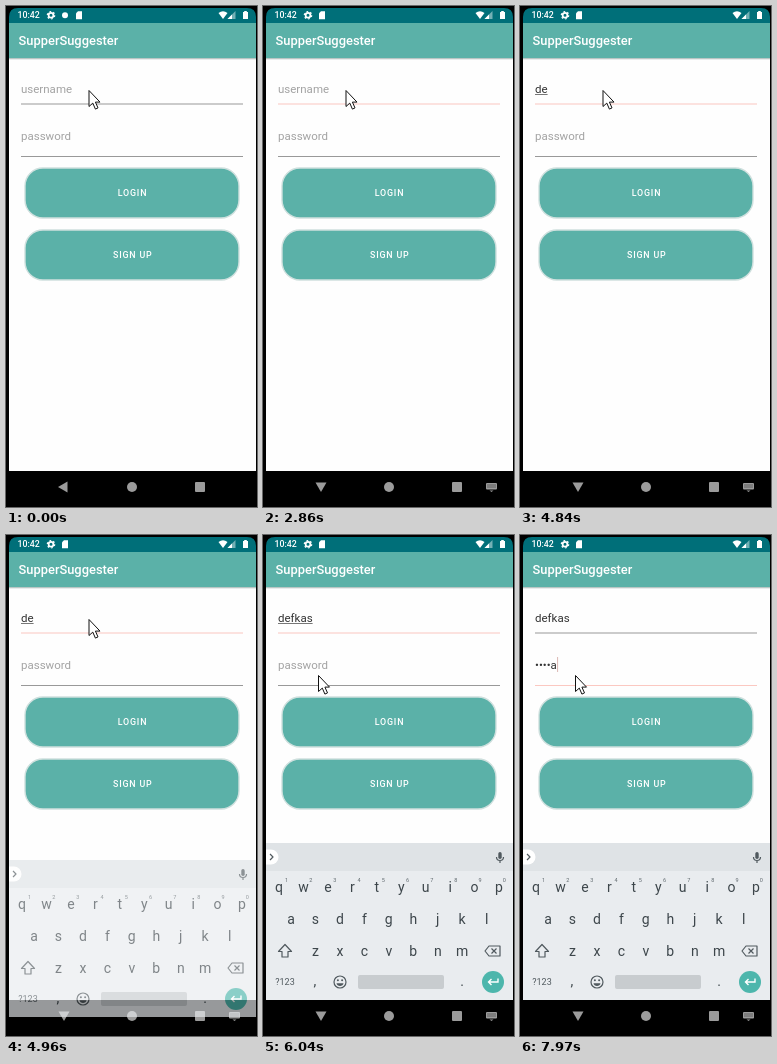
An HTML page that plays this animation: 251 px wide and 501 px high, repeating every 8 s.

```html
<!DOCTYPE html>
<html lang="en">
<head>
<meta charset="utf-8">
<title>Login screen</title>
<style>
html, body { margin: 0; overflow: hidden; background: #000; }
svg { display: block; font-family: Roboto, sans-serif; }
.field { font-size: 11.5px; }
.button rect { fill: #5bb1a8; stroke: #cfe0de; stroke-width: 1.4; }
.button text { font-size: 8.9px; font-weight: 500; letter-spacing: .8px; fill: #fff; text-anchor: middle; }
.key { font-size: 14px; fill: #3d464b; text-anchor: middle; }
.hint { font-size: 5.5px; fill: #5f686d; text-anchor: middle; }
.outline { fill: none; stroke: #50595e; stroke-width: 1.2; stroke-linejoin: round; }
</style>
</head>
<body>
<svg width="251" height="501" viewBox="0 0 251 501">
  <rect width="251" height="501" fill="#000"/>
  <rect x="3" y="40" width="247" height="425" fill="#fefefe"/>

  <!-- status bar -->
  <path d="M3 17V11Q3 2 12 2H241Q250 2 250 11V17Z" fill="#006f79"/>
  <g fill="#fff">
    <text x="11.5" y="12.4" font-size="8.8" font-weight="500">10:42</text>
    <circle cx="45" cy="9.3" r="2.4" fill="none" stroke="#fff" stroke-width="1.8"/>
    <circle cx="45" cy="9.3" r="3.7" fill="none" stroke="#fff" stroke-width="1.2" stroke-dasharray="1.7 2.17"/>
    <circle id="badge" cx="59" cy="9.3" r="3"/>
    <path id="card" d="M-1 -4H3V4H-3V-2Z"/>
    <path d="M212.5 7Q217 3.5 221.5 7L217 13Z"/>
    <path d="M229.5 5V13H221.5Z" opacity=".45"/>
    <path d="M226 8.5V13H221.5Z"/>
    <path d="M237 6H238.2V5H240.8V6H242V13H237Z"/>
  </g>

  <!-- app bar -->
  <rect x="3" y="17" width="247" height="35" fill="#5bb1a8"/>
  <rect x="3" y="52" width="247" height="1" fill="#b9c6c4"/>
  <rect x="3" y="53" width="247" height="1" fill="#e8ecec"/>
  <text x="12.5" y="39.3" font-size="12.9" font-weight="500" fill="#fff">SupperSuggester</text>

  <!-- form -->
  <text id="user" class="field" x="15" y="87"/>
  <rect id="compose" x="15" y="88" height="1" fill="#777"/>
  <rect id="userLine" x="15" y="97.5" width="222" height="1"/>
  <text id="pass" class="field" x="15" y="134"/>
  <rect id="passLine" x="15" y="150" width="222" height="1"/>
  <rect id="caret" width="1" height="15" fill="#dcb9b5"/>
  <g class="button">
    <rect x="19" y="162" width="214" height="50" rx="18"/>
    <text x="126.5" y="190.4">LOGIN</text>
    <rect x="19" y="224" width="214" height="50" rx="18"/>
    <text x="126.8" y="252.4">SIGN UP</text>
  </g>

  <!-- navigation bar -->
  <g fill="#9b9b9b">
    <path id="back" d="M-5 0L4.5 -5.5V5.5Z"/>
    <circle cx="126" cy="481" r="5"/>
    <rect x="189" y="476" width="10" height="10" rx="1"/>
    <g id="imeIcon">
      <rect x="223" y="477" width="11" height="6.5" rx="1"/>
      <path d="M224.5 479H233M224.5 481H233" stroke="#000" stroke-width=".8" stroke-dasharray="1 1"/>
      <path d="M226.5 484.5H230.5L228.5 486Z"/>
    </g>
  </g>

  <!-- keyboard -->
  <g id="keyboard">
    <rect x="3" y="308" width="247" height="157" fill="#e9ecef"/>
    <rect x="3" y="308" width="247" height="28" fill="#dfe3e6"/>
    <path d="M3 314.5H8A7.5 7.5 0 0 1 8 329.5H3Z" fill="#fff"/>
    <path class="outline" d="M7 319L10 322L7 325"/>
    <rect x="235.3" y="317" width="3.4" height="7" rx="1.7" fill="#50595e"/>
    <path class="outline" d="M233.5 322A3.5 3.5 0 0 0 240.5 322M237 325.5V328"/>
    <g id="keys"></g>
    <path class="outline" d="M22 409.5L28.5 416.5H25V422H19V416.5H15.5Z"/>
    <path class="outline" d="M222 416L226 411H237V421H226ZM228.5 413.5L233.5 418.5M233.5 413.5L228.5 418.5"/>
    <text x="22" y="450.3" font-size="9" fill="#50595e" text-anchor="middle">?123</text>
    <circle class="outline" cx="77" cy="447" r="6"/>
    <path d="M73.5 448.3H80.5A3.6 3.6 0 0 1 73.5 448.3Z" fill="#50595e"/>
    <circle cx="74.9" cy="445.3" r="1" fill="#50595e"/>
    <circle cx="79.1" cy="445.3" r="1" fill="#50595e"/>
    <rect x="95" y="440" width="86" height="14" rx="2" fill="#c8cccf"/>
    <circle cx="230" cy="447" r="11" fill="#4db6ac"/>
    <path d="M235 443.5V447H225.5M228.5 444L225.5 447L228.5 450" fill="none" stroke="#fff" stroke-width="1.4"/>
  </g>

  <path id="pointer" d="M0 0V16L3.8 12.6L6.4 18.6L9 17.4L6.4 11.6H11Z" fill="#fff" stroke="#111" stroke-linejoin="round"/>
</svg>
<script>
const LOOP = 8000;
const el = id => document.getElementById(id);
const set = (id, attrs) => {
  for (const name in attrs) el(id).setAttribute(name, attrs[name]);
};
const show = (id, on) => set(id, { visibility: on ? "visible" : "hidden" });

const label = (cls, x, y, text) => `<text class="${cls}" x="${x}" y="${y}">${text}</text>`;
const row = (letters, x, y) => [...letters].map((c, i) => label("key", x + i * 24.45, y, c)).join("");
el("keys").innerHTML =
  row("qwertyuiop", 16, 357) + row("asdfghjkl", 28, 388.5) + row("zxcvbnm", 52.5, 420.5) +
  [..."1234567890"].map((c, i) => label("hint", 23.5 + i * 24.2, 347, c)).join("") +
  label("key", 52, 451, ",") + label("key", 199, 451, ".");

const start = {
  badge: true, ime: false, user: "", pass: "", composing: true, caret: "",
  userFocus: false, passFocus: false, keyboard: 0, drop: 0, pointer: [83, 84.5]
};

// Each step: time in ms and what changes then
const steps = [
  [840, { badge: false }],
  [1110, { userFocus: true, caret: "user" }],
  [1530, { caret: "" }],
  [2090, { caret: "user" }],
  [2550, { caret: "" }],
  [2860, { ime: true }],
  [3010, { caret: "user" }],
  [3280, { user: "d" }],
  [3600, { caret: "" }],
  [4210, { caret: "user" }],
  [4360, { user: "de" }],
  [4840, { caret: "" }],
  [4960, { keyboard: .65, drop: 17 }],
  [5080, { user: "def", caret: "user", keyboard: 1, drop: 0 }],
  [5350, { user: "defkas" }],
  [5780, { caret: "" }],
  [5900, { pointer: [61, 122.5] }],
  [6040, { pointer: [55.5, 140.5] }],
  [6190, { passFocus: true }],
  [6330, { userFocus: false, composing: false, caret: "pass" }],
  [6790, { caret: "" }],
  [7370, { caret: "pass" }],
  [7520, { pass: "d" }],
  [7670, { pass: "•e" }],
  [7820, { pass: "••f" }],
  [7970, { pass: "••••a" }]
];

function field(id, value, hint, focused) {
  el(id).textContent = value || hint;
  set(id, { fill: value ? "#333" : "#a3a3a3" });
  set(id + "Line", { fill: focused ? "#fbc8c1" : "#999" });
  return value ? el(id).getComputedTextLength() : 0;
}

function draw(time) {
  const s = Object.assign({}, start, ...steps.filter(step => step[0] <= time).map(step => step[1]));
  const width = {
    user: field("user", s.user, "username", s.userFocus),
    pass: field("pass", s.pass, "password", s.passFocus)
  };
  set("compose", { width: s.composing ? width.user : 0 });
  show("caret", s.caret);
  if (s.caret) set("caret", { x: 15.3 + width[s.caret], y: s.caret === "user" ? 75 : 122 });
  show("badge", s.badge);
  set("card", { transform: `translate(${s.badge ? 73 : 59} 9.3)` });
  set("back", { transform: s.ime ? "translate(58 481) rotate(-90)" : "translate(57 481)" });
  show("imeIcon", s.ime);
  set("keyboard", { opacity: s.keyboard, transform: `translate(0 ${s.drop})` });
  set("pointer", { transform: `translate(${s.pointer})` });
}

let origin;
function tick(now) {
  origin ??= now;
  draw((now - origin) % LOOP);
  requestAnimationFrame(tick);
}
draw(0);
requestAnimationFrame(tick);
</script>
</body>
</html>
```
